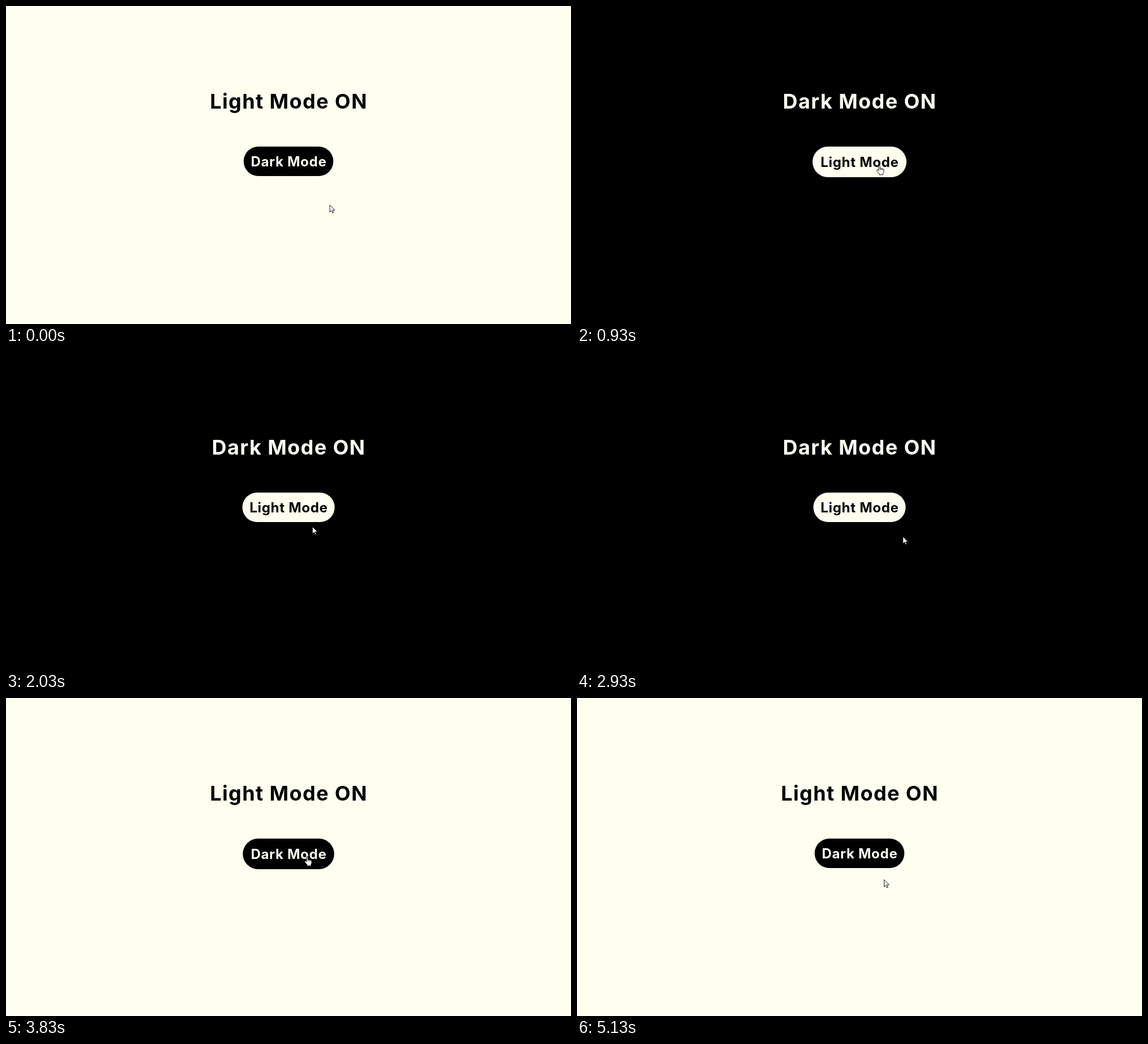
Animation, 998 px wide and 561 px high, one loop 5260 ms. Source, as an HTML page:

```html
<!DOCTYPE html>
<html lang="en">
<head>
<meta charset="utf-8">
<title>Light and dark mode</title>
<style>
  html, body { margin: 0; width: 100%; height: 100%; overflow: hidden; }
  svg { display: block; width: 100vw; height: 100vh; }
  text { font-family: Montserrat, Inter, sans-serif; font-weight: 700; text-anchor: middle; }
  #title { font-size: 36px; letter-spacing: .039em; }
  #label { font-size: 24px; letter-spacing: .03em; }
  .cursor { fill: #fff; stroke: #000; stroke-width: 1.2; stroke-linejoin: round; }
</style>
</head>
<body>
<svg viewBox="0 0 998 561">
  <rect id="page" width="998" height="561"/>
  <text id="title" x="499.5" y="181"></text>
  <rect id="pill" y="248"/>
  <text id="label" x="499.4"></text>
  <g id="arrow" class="cursor">
    <path transform="scale(.74)" d="M0 0V17L4 13.3L6.6 19.3L9.1 18.2L6.5 12.3H12Z"/>
  </g>
  <g id="hand" class="cursor">
    <g transform="scale(.76) translate(-6.6 0)">
      <path d="M5 12.6V1.8a1.6 1.6 0 0 1 3.2 0V7.2q1.5-1 3 .5q1.7-.8 2.9.7q2.9-.3 2.9 2.3V15q0 2.5-2 4.5V22H6.5V19.5L1 13Q-.3 10.8 1.5 10.3Q3 10 5 12.6Z"/>
      <path fill="none" d="M8.2 7.2v4M11.2 7.7v3.5M14.1 8.4v3"/>
    </g>
  </g>
</svg>
<script>
const LOOP = 5260, TO_DARK = 930, TO_LIGHT = 3830;
const IVORY = '#fffff0', BLACK = '#000';
const $ = id => document.getElementById(id);

const ease = {
  in: u => u * u,
  out: u => 1 - (1 - u) ** 2,
  both: u => u * u * (3 - 2 * u)
};

// Pointer stops: time, x, y, easing used to arrive there
const stops = [
  [0, 572, 351, 'both'],
  [400, 534, 281, 'both'],
  [1900, 534, 281, 'both'],
  [2030, 541, 308, 'in'],
  [2400, 585, 335, 'out'],
  [2800, 585, 335, 'both'],
  [3300, 530.5, 280, 'both'],
  [3370, 532, 279.5, 'out'],
  [4570, 532, 279.5, 'both'],
  [5070, 544, 320.5, 'both'],
  [5130, 542.5, 320.5, 'out'],
  [LOOP, 542.5, 320.5, 'both']
];

function pointer(t) {
  const i = stops.findIndex(s => s[0] > t);
  const [t0, x0, y0] = stops[i - 1], [t1, x1, y1, kind] = stops[i];
  const k = ease[kind]((t - t0) / (t1 - t0));
  return [x0 + (x1 - x0) * k, y0 + (y1 - y0) * k];
}

function overPill(x, y) {
  const nearX = Math.min(552, Math.max(446, x));
  return Math.hypot(x - nearX, y - 274) <= 27;
}

function set(id, attrs) {
  for (const name in attrs) $(id).setAttribute(name, attrs[name]);
}

function draw(t) {
  const dark = t >= TO_DARK && t < TO_LIGHT;
  const [x, y] = pointer(t);
  const hover = overPill(x, y);
  const ink = dark ? IVORY : BLACK;
  const paper = dark ? BLACK : IVORY;
  const w = (dark ? 163 : 158.5) + (hover ? 3 : 0);
  const h = hover ? 54 : 52;

  set('page', { fill: paper });
  set('title', { fill: ink });
  set('pill', { x: 499 - w / 2, width: w, height: h, rx: h / 2, fill: ink });
  set('label', { y: hover ? 284 : 282.5, fill: paper });
  $('title').textContent = dark ? 'Dark Mode ON' : 'Light Mode ON';
  $('label').textContent = dark ? 'Light Mode' : 'Dark Mode';

  const transform = `translate(${x} ${y})`;
  set('arrow', { transform, visibility: hover ? 'hidden' : 'visible' });
  set('hand', { transform, visibility: hover ? 'visible' : 'hidden' });
}

const start = performance.now();
function tick() {
  draw((performance.now() - start) % LOOP);
  requestAnimationFrame(tick);
}
tick();
</script>
</body>
</html>
```
